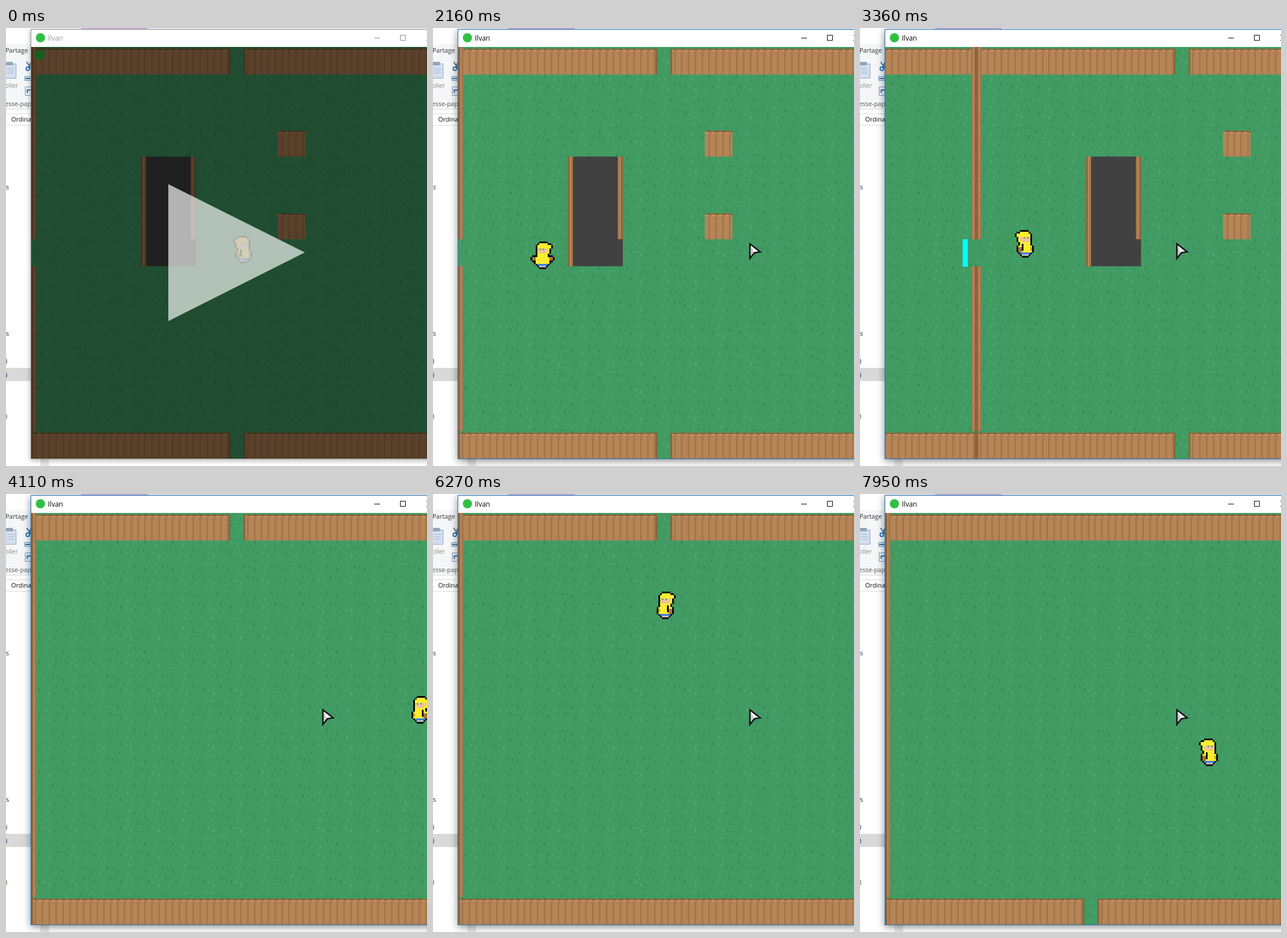
These frames come from a looping animation (734x763 px, 8000 ms). An HTML page with a canvas:

```html
<!DOCTYPE html>
<html lang="fr">
<head>
<meta charset="utf-8">
<style>
html, body { margin: 0; width: 100%; height: 100%; overflow: hidden; background: #fff }
svg, canvas { position: absolute; left: 0; top: 0 }
canvas { left: 44px; top: 33px }
text { font: 11px "Open Sans", "Noto Sans", sans-serif }
#win { fill: #fff; stroke: #1a70b8; filter: drop-shadow(0 3px 7px #0007) }
#title { fill: #000; font-size: 12px }
#btn { fill: none; stroke: #000 }
.idle #win { stroke: #8a8f8c; filter: drop-shadow(0 2px 5px #0005) }
.idle #title { fill: #999 }
.idle #btn { stroke: #888 }
</style>
</head>
<body>
<svg id="ui" width="734" height="763">
  <path fill="#f5f6f7" d="M0 28h44v113H0z"/>
  <path fill="#d8c0ea" d="M131 0h116v3H131z"/>
  <path fill="#e6e6e6" d="M60 750h15v13H60z"/>
  <path fill="#d9d9d9" d="M0 592h44v23H0z"/>
  <path stroke="#dcdcdc" d="M0 141.5h44M0 149.5h44M0 169.5h44"/>
  <path fill="#d4e0f0" stroke="#8fa5c4" d="M-6 62.5H17.5v25H-6z"/>
  <path fill="#93a5bd" d="M0 59h12v6H0z"/>
  <path stroke="#9fb8d8" d="M2 70.5h12M2 74.5h12M2 78.5h12"/>
  <path fill="none" stroke="#4a7394" stroke-width="2" d="M36 59l8 12M44 59l-4 9"/>
  <circle cx="38" cy="71" r="3" fill="none" stroke="#2878b8" stroke-width="2"/>
  <path fill="#cde6f7" stroke="#5d9cc9" d="M32.5 84.5h14v7h-14z"/>
  <path stroke="#234" stroke-width="2" stroke-dasharray="2 1" d="M34 88h10"/>
  <path fill="#e6edf6" stroke="#8296b0" d="M33.5 102.5h14v15h-14z"/>
  <path fill="none" stroke="#3b6ea8" stroke-width="2" d="M37 113v-5h6"/>
  <text x="-1" y="43" fill="#333">Partage</text>
  <text x="-2" y="104" fill="#888">oller</text>
  <text x="-2" y="136" fill="#555">esse-pap</text>
  <text x="9" y="163" fill="#111">Ordina</text>
  <g fill="#1b2a5c">
    <text x="-4" y="281">ts</text><text x="-4" y="536" fill="#222">ts</text>
    <text x="-1" y="584">)</text><text x="-1" y="608">)</text><text x="-1" y="680" fill="#654b10">)</text>
  </g>
  <rect id="win" x="43.5" y="2.5" width="720" height="748"/>
  <circle cx="60" cy="17" r="8" fill="#2fc043"/>
  <text id="title" x="73" y="22">Ilvan</text>
  <path id="btn" d="M642 17.5h10M687.5 12.5h9v9h-9zM733 12l10 10M733 22l10-10"/>
</svg>
<canvas id="game" width="690" height="717"></canvas>
<script>
const ui = document.getElementById('ui');
const ctx = document.getElementById('game').getContext('2d');
const X0 = 44, Y0 = 33, ROOM = 717, TILE = 48, SIZE = 15 * TILE;
const STEP = 30, LOOP = 8000, SPEED = 9.6, SCROLL = 9;
const DARK = '#8c633b', WOOD = '#b58457', LINE = '#a3764b', EDGE = '#c98f5c';

// Rooms are painted once at 48 units per tile; doors is any of "tblr".
function makeRoom(doors, furnished) {
  const cv = document.createElement('canvas');
  cv.width = cv.height = SIZE;
  const c = cv.getContext('2d');
  const box = (col, x, y, w, h) => { c.fillStyle = col; c.fillRect(x, y, w, h); };

  const fence = (x, y, w) => {
    box(WOOD, x, y + 6, w, TILE - 6);
    for (let i = x; i < x + w; i += 12) {
      box(DARK, i, y + 3, 12, 3);
      box(EDGE, i, y + 5, 6, 3);
      box(LINE, i + 6, y + 8, 3, TILE - 8);
    }
  };
  const fenceRow = (y, door) => {
    fence(0, y, door ? 348 : SIZE);
    if (!door) return;
    fence(372, y, 348);
    for (const x of [345, 372]) box(DARK, x, y + 3, 3, TILE - 3);
  };
  const wall = (x, y, h, flip) => {
    box(WOOD, x, y, 9, h);
    box(DARK, x + (flip ? 6 : 0), y, 3, h);
    box(LINE, x + (flip ? 0 : 6), y, 3, h);
  };
  const side = (x, door, flip) => {
    wall(x, 0, door ? 7 * TILE : 14 * TILE, flip);
    if (door) wall(x, 8 * TILE, 6 * TILE, flip);
    box(DARK, x + (flip ? 6 : 0), 14 * TILE, 3, TILE);
  };

  box('#419b63', 0, 0, SIZE, SIZE);
  for (let y = 0; y < SIZE; y += TILE)
    for (let x = 0; x < SIZE; x += TILE)
      for (let i = 0; i < 12; i++)
        box(i % 3 ? '#3b8f5b' : '#4ca76c',
          x + (i * 5 + 10) % 16 * 3, y + (i * 7 + 8) % 16 * 3, 3, i % 2 ? 3 : 6);
  fenceRow(0, doors.includes('t'));
  fenceRow(14 * TILE, doors.includes('b'));
  side(0, doors.includes('l'), false);
  side(SIZE - 9, doors.includes('r'), true);
  if (furnished) {
    box('#414141', 4 * TILE, 4 * TILE, 2 * TILE, 4 * TILE);
    wall(4 * TILE, 4 * TILE, 4 * TILE, false);
    wall(6 * TILE - 9, 4 * TILE, 3 * TILE, true);
    for (const row of [3, 6]) fence(9 * TILE, row * TILE, TILE);
  }
  return cv;
}

const rooms = [
  { x: 0, y: 0, img: makeRoom('tbl', true) },
  { x: -1, y: 0, img: makeRoom('tr') },
  { x: -1, y: -1, img: makeRoom('b') }
];

// Arrow keys held, with their times in ms; everything else follows from the game rules.
const DIRS = { L: [-1, 0], R: [1, 0], U: [0, -1], D: [0, 1] };
const keys = ('R480-720 L720-1170 U1170-1290 D1290-1590 L1680-2700 U2010-2220 R3000-3390 ' +
  'L3570-3900 R4440-4710 L4740-4890 L5130-6240 U5700-6960 U7170-7920 R7290-7920')
  .split(' ').map(k => {
    const [from, to] = k.slice(1).split('-').map(Number);
    return { dir: DIRS[k[0]], from, to };
  });

function play() {
  const s = { x: 413, y: 386, right: true, moving: false, room: [0, 0], cam: [0, 0], way: [0, 0] };
  const states = [];
  for (let t = 0; t <= LOOP; t += STEP) {
    states.push({ ...s, room: [...s.room], cam: [...s.cam], way: [...s.way] });
    // The camera counts in parts of a room.
    s.cam = s.cam.map((c, i) => c + Math.sign(s.room[i] * SCROLL - c));
    s.moving = false;
    for (const { dir, from, to } of keys) {
      if (t < from || t >= to) continue;
      s.x += dir[0] * SPEED;
      s.y += dir[1] * SPEED;
      s.moving = true;
      if (dir[0]) s.right = dir[0] > 0;
    }
    const left = X0 - 1 + s.room[0] * ROOM, top = Y0 + s.room[1] * ROOM;
    const dx = s.x < left + 16 ? -1 : s.x > left + ROOM - 16 ? 1 : 0;
    const dy = s.y < top - 9 ? -1 : 0;
    if (dx) s.x = left + (dx > 0 ? ROOM : 0) + dx * 18;
    if (dx || dy) {
      s.way = [dx, dy];
      s.room = [s.room[0] + dx, s.room[1] + dy];
    }
  }
  return states;
}
const states = play();

// Each part gets a black rim; the hero faces left on a grid of 3 px cells.
const YELLOW = '#fbee2f', SKIN = '#efc39a', BROWN = '#a9713f', BLUE = '#3f7fe8';
const BODY = [
  [YELLOW, 3, 1, 5, 1], [YELLOW, 2, 2, 8, 2], [YELLOW, 2, 4, 7, 3],
  [YELLOW, 2, 7, 6, 2], [YELLOW, 1, 9, 8, 4], [BLUE, 2, 13, 6, 1], ['#b9b9c4', 3, 14, 4, 1]
];
const ARMS = [[BROWN, -1, 9, 2, 2], [BROWN, 9, 9, 2, 2]];

function drawHero(x, y, right, stride) {
  const cell = (col, ...r) => { ctx.fillStyle = col; ctx.fillRect(...r); };
  const parts = stride ? [...BODY, ...ARMS] : BODY;
  ctx.save();
  ctx.translate(Math.round(x), Math.round(y));
  ctx.scale(right ? -3 : 3, 3);
  ctx.translate(-16 / 3, -8);
  for (const [, a, b, w, h] of parts) {
    cell('#050505', a - 1, b, w + 2, h);
    cell('#050505', a, b - 1, w, h + 2);
  }
  for (const p of parts) cell(...p);
  cell(SKIN, 2, 4, 6, 2);
  cell(SKIN, 3, 6, 4, 1);
  for (const eye of [3, 5]) cell('#7fae4b', eye, 4, 1, 1);
  if (!stride) {
    cell('#050505', 6, 8, 1, 4);
    cell(BROWN, 7, 10, 2, 3);
    cell('#c9a51c', 1, 10, 1, 2);
  }
  ctx.restore();
}

function poly(pts, fill) {
  ctx.beginPath();
  pts.forEach(p => ctx.lineTo(...p));
  ctx.closePath();
  ctx.fillStyle = fill;
  ctx.fill();
}

function drawCursor(x, y) {
  ctx.save();
  ctx.translate(x, y);
  poly([[1.5, 3], [19.5, 17], [9.5, 18.5], [1.5, 28.5]], '#f4f4f6');
  poly([[2, 4], [8, 18], [2, 27]], '#c6c6d4');
  poly([[1.5, 3], [19.5, 17], [9.5, 18.5], [1.5, 28.5]], 'transparent');
  ctx.strokeStyle = '#111';
  ctx.lineWidth = 2.5;
  ctx.stroke();
  ctx.restore();
}

// Bar on the door just left, in the room the hero came from.
function drawDoorBar({ room, way: [dx, dy] }) {
  const x = (room[0] - dx + .5) * ROOM + X0 + dx * (ROOM / 2 - 20);
  const y = (room[1] - dy + .5) * ROOM + Y0 + dy * (ROOM / 2 - 20);
  const w = dx ? 9 : 24, h = dx ? 48 : 9;
  ctx.fillStyle = '#0ff';
  ctx.fillRect(Math.round(x - w / 2), Math.round(y - h / 2), w, h);
}

function draw(now) {
  const t = Math.floor(now % LOOP / STEP) * STEP;
  const s = states[t / STEP];
  const [ox, oy] = s.cam.map(c => Math.round(-c * ROOM / SCROLL));
  const scrolling = s.cam.some((c, i) => c && c !== s.room[i] * SCROLL || !c && s.room[i]);
  ui.setAttribute('class', t < 330 ? 'idle' : '');

  ctx.setTransform(1, 0, 0, 1, ox - X0, oy - Y0);
  ctx.imageSmoothingEnabled = false;
  for (const r of rooms) ctx.drawImage(r.img, X0 + r.x * ROOM, Y0 + r.y * ROOM, ROOM, ROOM);
  if (scrolling) drawDoorBar(s);
  drawHero(s.x, s.y, s.right, s.moving && Math.floor(t / 90) % 4 === 0);

  ctx.setTransform(1, 0, 0, 1, -X0, -Y0);
  if (t < 300) {
    ctx.fillStyle = '#2fc043';
    ctx.beginPath();
    ctx.arc(59, 47, 9, 0, 7);
    ctx.fill();
    ctx.fillStyle = 'rgba(0,0,0,.5)';
    ctx.fillRect(X0, Y0, 690, ROOM);
    poly([[283, 272], [521, 391], [283, 510.5]], 'rgba(255,255,255,.66)');
  } else drawCursor(551, 373);
}

function loop() {
  draw(performance.now());
  requestAnimationFrame(loop);
}
loop();
</script>
</body>
</html>
```
